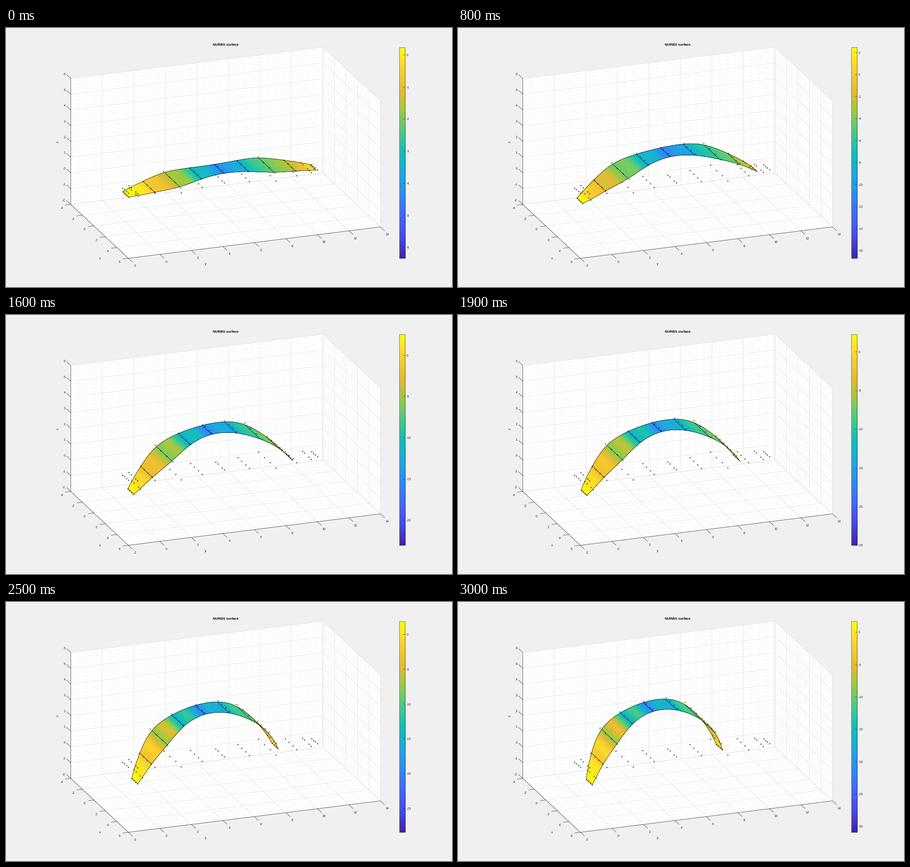
These frames come from a looping animation (981 by 571 pixels, 5 s). A matplotlib script:

```python
import numpy as np
import matplotlib.pyplot as plt
from matplotlib.animation import FuncAnimation
from matplotlib.collections import LineCollection, PolyCollection
from matplotlib.colors import LinearSegmentedColormap

W, H, DPI = 981, 571, 64
PT = 72 / DPI                     # points per pixel
plt.rcParams["font.family"] = "Liberation Sans"
plt.rcParams["path.snap"] = False
DARK = "#262626"

PARULA = LinearSegmentedColormap.from_list("parula", [
    "#3e26a8", "#4849ed", "#4467fd", "#2d8cf3", "#1caadf", "#12beb9",
    "#48cb86", "#9fc942", "#eaba31", "#fad42e", "#f9fb15"])

# Orthographic view: screen vectors of one unit along each axis
ORIGIN = np.array([142.5, 389.0])
EX, EY, EZ = np.array([[12.66, 11.87], [34.66, -4.33], [0, -34.69]])

# Control net: 11 rows of 4 points along y, cubic with 8 spans
SPANS, DEGREE, SPAN_LENGTH, LENGTH = 8, 3, 1.5, 12
KNOTS = np.r_[[0] * DEGREE, np.arange(SPANS + 1), [SPANS] * DEGREE]
ROW_Y = SPAN_LENGTH * (KNOTS[1:-3] + KNOTS[2:-2] + KNOTS[3:-1]) / DEGREE
HALF_WIDTHS = [1, 1.5, 2, 3, 2, 1.5]
ROW_W = np.array(HALF_WIDTHS + HALF_WIDTHS[-2::-1])
COLS = np.array([[0, .25, .75, 1] if row % 4 == 1 else [0, 1 / 3, 2 / 3, 1]
                 for row in range(11)])
NET_X = (COLS - .5) * ROW_W[:, None]


def project(x, y, z):
    x, y, z = (np.asarray(c, float)[..., None] for c in (x, y, z))
    return ORIGIN + EX * (x + 4) + EY * (y + 2) + EZ * (z + 2)


def bspline_matrix(u):
    u = np.minimum(u, SPANS - 1e-9)[:, None]
    basis = ((KNOTS[:-1] <= u) & (u < KNOTS[1:])).astype(float)
    for d in range(1, DEGREE + 1):
        n = len(KNOTS) - d - 1
        left, right = KNOTS[:n], KNOTS[d + 1:]
        rise = np.maximum(KNOTS[d:d + n] - left, 1e-12)
        fall = np.maximum(right - KNOTS[1:1 + n], 1e-12)
        basis = (u - left) / rise * basis[:, :n] + (right - u) / fall * basis[:, 1:]
    return basis


PER_SPAN = 24
U = np.linspace(0, SPANS, SPANS * PER_SPAN + 1)
BASIS = bspline_matrix(U)


def along(y):
    """Share of the way from the support near the left end to the right tip."""
    return np.clip(y - 1, 0, 11) / 11


def centre_line(step):
    """Buckled strip: slope angles summed back from the sliding right tip."""
    root = np.sqrt(step)
    q = along((ROW_Y[:-1] + ROW_Y[1:]) / 2)
    straight = .1 * root
    shape = ((1 - straight) * np.cos(np.pi * q) + straight * (1 - 2 * q)
             + .4 * q ** 2 * (.88 - q))
    angle = np.radians(root * (11.45 + .054 * step)) * shape
    length = np.diff(ROW_Y) * (1 + .00046 * step)

    def sum_back(parts):
        return np.r_[np.cumsum(parts[::-1])[::-1], 0]

    return (LENGTH - .1 * step - sum_back(length * np.cos(angle)),
            -sum_back(length * np.sin(angle)))


def stress_range(step):
    top = min(.318 * step - .085, 1.4 + 1.145 * .9 ** (step - 16))
    return -6.34 * step ** .466, top


def stress(step):
    """Bending moment over strip width, eased between the knots."""
    low, top = stress_range(step)
    u = (U[:-1] + U[1:]) / 2
    y = u * SPAN_LENGTH
    width = bspline_matrix(u) @ ROW_W
    q = along(y)
    ripple = (.3 + .024 * step) * (1 - q) ** 2 * np.sin(np.pi * u) ** 2
    moment = np.sin(np.pi * q) * (width.min() / width) ** .8 * (1 - ripple)
    return low * moment + top * np.exp(-(y / .5) ** 2)


fig = plt.figure(figsize=(W / DPI, H / DPI), dpi=DPI, facecolor="#f0f0f0")
ax = fig.add_axes([0, 0, 1, 1])


def label(x, y, text, size=7, **kw):
    kw = {"ha": "center", "va": "center_baseline", "color": DARK, **kw}
    return ax.text(x, y, text, fontsize=size * PT, **kw)


def lines(segments, color, width, z, **kw):
    item = LineCollection(segments, colors=color, linewidths=width * PT, zorder=z, **kw)
    ax.add_collection(item)
    return item


def grid(step_x, step_y, step_z):
    ends = []
    for x in np.arange(-4, 6.01, step_x):
        ends += [((x, -2, -2), (x, 14, -2)), ((x, 14, -2), (x, 14, 6))]
    for y in np.arange(-2, 14.01, step_y):
        ends += [((-4, y, -2), (6, y, -2)), ((-4, y, -2), (-4, y, 6))]
    for z in np.arange(-2, 6.01, step_z):
        ends += [((-4, -2, z), (-4, 14, z)), ((-4, 14, z), (6, 14, z))]
    return [(project(*a), project(*b)) for a, b in ends]


def draw_box():
    faces = [[(-4, -2, -2), (-4, 14, -2), (-4, 14, 6), (-4, -2, 6)],
             [(-4, 14, -2), (6, 14, -2), (6, 14, 6), (-4, 14, 6)],
             [(-4, -2, -2), (6, -2, -2), (6, 14, -2), (-4, 14, -2)]]
    ax.add_collection(PolyCollection([[project(*p) for p in f] for f in faces],
                                     facecolors="white", edgecolors="none", zorder=0))
    lines(grid(.5, .5, .2), "#dedede", .5, 1, linestyles=(0, (1, 1.5)))
    lines(grid(2, 2, 1), "#dcdcdc", .65, 1.1)

    corners = [project(*p) for p in [(-4, -2, 6), (-4, -2, -2), (6, -2, -2), (6, 14, -2)]]
    ticks = []
    for z in range(-2, 7):
        p = project(-4, -2, z)
        ticks.append((p, p - (9.3, 8.7)))
        label(130.5, p[1] - 10, str(z), ha="right")
    for x in range(-4, 7, 2):
        p = project(x, -2, -2)
        ticks.append((p, p + (-12.6, 1.6)))
        label(p[0] - 20, p[1] + 7.5, str(x))
    for y in range(-2, 15, 2):
        p = project(6, y, -2)
        ticks.append((p, p + (9.3, 8.7)))
        label(p[0] + 14.3, p[1] + 16, str(y))
    lines([corners] + ticks, DARK, .7, 1.2)
    label(206.5, 507, "x", 7.6)
    label(438.5, 520, "y", 7.6)
    label(114, 251, "z", 7.6, rotation=90, va="center")
    label(483, 36.4, "NURBS surface", 7.6, weight="bold", color="black")


BAR_L, BAR_R, BAR_T, BAR_B = 865.5, 878, 43, 508
draw_box()
ax.imshow(np.linspace(1, 0, 256)[:, None], cmap=PARULA, aspect="auto",
          extent=(BAR_L, BAR_R, BAR_B, BAR_T), interpolation="nearest", zorder=1)
lines([[(BAR_L, BAR_T), (BAR_R, BAR_T), (BAR_R, BAR_B), (BAR_L, BAR_B), (BAR_L, BAR_T)]],
      DARK, .6, 2)
bar_ticks = lines([], DARK, .6, 2)
bar_labels = [label(881, 0, "", ha="left") for _ in range(14)]

# Rest net: the first two rows lie in front of the strip, the others behind
rest_net = project(NET_X, ROW_Y[:, None], 0)
for rows, z in ((slice(0, 2), 6), (slice(2, 11), 2)):
    pts = rest_net[rows].reshape(-1, 2)
    ax.plot(pts[:, 0], pts[:, 1], "x", color="black", ms=2.7 * PT, mew=.6 * PT, zorder=z)

strip = PolyCollection([], zorder=3, antialiaseds=False, edgecolors="none")
ax.add_collection(strip)
outline = lines([], "black", .7, 4)
net, = ax.plot([], [], "o", mfc="none", mec="black", ms=2.2 * PT, mew=.55 * PT, zorder=5)

ax.set_xlim(0, W)
ax.set_ylim(H, 0)
ax.axis("off")


def update_colorbar(low, top):
    span = top - low
    gap = 1 if span < 10 else 2 if span < 20 else 5
    values = np.arange(np.ceil(low / gap), np.floor(top / gap) + 1) * gap
    heights = BAR_T + (top - values) / span * (BAR_B - BAR_T)
    bar_ticks.set_segments([[(BAR_R - 4.6, y), (BAR_R, y)] for y in heights])
    for item in bar_labels:
        item.set_text("")
    for item, value, y in zip(bar_labels, values, heights):
        item.set_text(str(int(value)))
        item.set_y(y)


def update(frame):
    step = min(max(frame, 1), 30)
    y, z = centre_line(step)
    points = project(NET_X, y[:, None], z[:, None])
    back, front = BASIS @ points[:, 0], BASIS @ points[:, 3]
    low, top = stress_range(step)

    strip.set_verts(np.stack([back[:-1], back[1:], front[1:], front[:-1]], 1))
    strip.set_facecolor(PARULA((stress(step) - low) / (top - low)))
    ribs = [np.array([back[i], front[i]]) for i in range(0, len(U), PER_SPAN)]
    outline.set_segments([back, front] + ribs)
    net.set_data(points[..., 0].ravel(), points[..., 1].ravel())
    update_colorbar(low, top)
    return [strip, outline, net, bar_ticks, *bar_labels]


anim = FuncAnimation(fig, update, frames=50, interval=100, repeat=True,
                     repeat_delay=0, blit=False)
plt.show()
```
